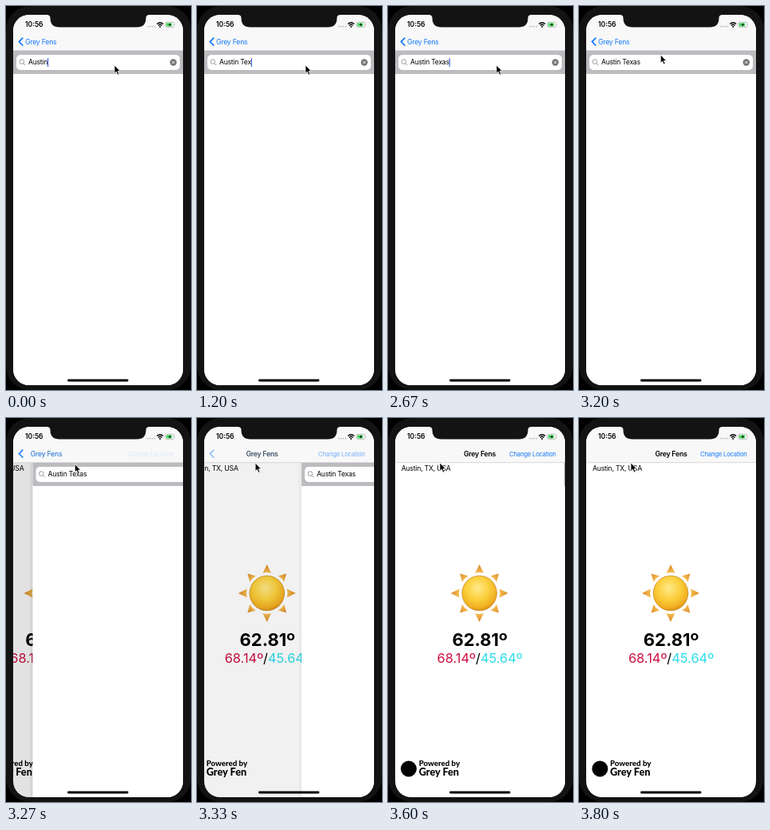
An HTML page that plays this animation: 232 px wide and 480 px high, repeating every 3990 ms.

```html
<!DOCTYPE html>
<html lang="en">
<head>
<meta charset="utf-8">
<title>Weather search</title>
<style>
  html, body { margin: 0; width: 100%; height: 100%; overflow: hidden; background: #000; }
  svg { display: block; width: 100vw; height: 100vh; }
  text { font: 8.75px Inter, "Liberation Sans", sans-serif; letter-spacing: -.25px; white-space: pre; }
  .mid { text-anchor: middle; }
  .blue { fill: #1479fb; }
  .bold { font-weight: 600; }
  .brand { font-family: Lato, "Open Sans", sans-serif; font-weight: 800; letter-spacing: 0; }
</style>
</head>
<body>
<svg viewBox="0 0 232 480">
  <defs>
    <clipPath id="screen"><rect x="9" y="11" width="213" height="463" rx="20"/></clipPath>
    <clipPath id="body"><rect x="9" y="56" width="213" height="418"/></clipPath>
    <radialGradient id="disc" cx=".45" cy=".36" r=".66">
      <stop offset="0" stop-color="#ffe98a"/>
      <stop offset=".5" stop-color="#fbd03c"/>
      <stop offset=".85" stop-color="#f0ae20"/>
      <stop offset="1" stop-color="#d48a18"/>
    </radialGradient>
    <linearGradient id="ray" x1="0" y1="0" x2="1" y2="0">
      <stop offset="0" stop-color="#f8bd50"/>
      <stop offset="1" stop-color="#d98a2a"/>
    </linearGradient>
    <linearGradient id="shade">
      <stop offset="0" stop-opacity="0"/>
      <stop offset="1" stop-opacity=".1"/>
    </linearGradient>
  </defs>

  <rect width="232" height="480"/>
  <rect width="232" height="480" rx="30" fill="#131313"/>

  <g clip-path="url(#screen)">
    <rect x="9" y="11" width="213" height="463" fill="#fff"/>

    <g clip-path="url(#body)">
      <g id="weather">
        <text x="17" y="66.3">Austin, TX, USA</text>
        <g id="sun" transform="translate(115 219)">
          <circle r="21.8" fill="url(#disc)" stroke="#c98a22" stroke-width=".8"/>
        </g>
        <text class="mid" x="115.5" y="284.5" style="font-size:22px;font-weight:700;letter-spacing:0">62.81º</text>
        <text class="mid" x="115.5" y="306.3" style="font-size:16.4px;letter-spacing:0"><tspan fill="#cb1040">68.14º</tspan>/<tspan fill="#2adcea">45.64º</tspan></text>
        <circle cx="26.3" cy="438.5" r="10"/>
        <text class="brand" x="39" y="435.3" style="font-size:9.7px">Powered by</text>
        <text class="brand" x="39" y="446.8" style="font-size:12.7px">Grey Fen</text>
      </g>
      <rect id="dim" x="9" y="56" width="213" height="418"/>

      <g id="search">
        <rect id="edge" x="4" y="56" width="5" height="418" fill="url(#shade)"/>
        <rect x="9" y="56" width="213" height="418" fill="#fff"/>
        <rect x="9" y="56" width="213" height="29" fill="#bcbbc0"/>
        <rect x="13" y="61" width="205" height="19" rx="5" fill="#fff"/>
        <g fill="none" stroke="#8e8e93" stroke-width=".9">
          <circle cx="19.8" cy="69.6" r="2.8"/>
          <path d="M21.9 71.7 L24.4 74.2"/>
        </g>
        <text id="query" x="28" y="73.4" style="font-size:8.6px"></text>
        <rect id="caret" y="65" width="1.1" height="11" fill="#3a5fe0"/>
        <circle cx="209.8" cy="70.5" r="4.2" fill="#747478"/>
        <path d="M208.2 68.9 l3.2 3.2 m0 -3.2 l-3.2 3.2" stroke="#fff" stroke-width=".9"/>
      </g>
    </g>

    <rect x="9" y="11" width="213" height="45" fill="#f8f8f8"/>
    <rect x="9" y="55.6" width="213" height=".5" fill="#b4b4b6"/>
    <path id="chevron" d="M21.3 39.6 L16.4 44.6 L21.3 49.6" fill="none" stroke="#1479fb" stroke-width="1.7"/>
    <text id="back" class="blue" y="47.8">Grey Fens</text>
    <text id="title" class="mid bold" y="47.8">Grey Fens</text>
    <text id="change" class="blue" x="152" y="47.5" style="font-size:7.7px;letter-spacing:-.2px">Change Location</text>

    <text class="bold" x="24" y="26.4" style="font-size:8.5px;letter-spacing:0">10:56</text>
    <g fill="#b5b5b5">
      <circle cx="178" cy="25.6" r=".9"/><circle cx="180.8" cy="25.6" r=".9"/>
      <circle cx="183.6" cy="25.6" r=".9"/><circle cx="186.4" cy="25.6" r=".9"/>
    </g>
    <g fill="none" stroke="#000" stroke-width="1.4">
      <path d="M189.2 22.6 Q193.2 18.8 197.2 22.6"/>
      <path d="M190.9 24.4 Q193.2 22.2 195.5 24.4"/>
    </g>
    <circle cx="193.2" cy="26" r="1"/>
    <rect x="199.8" y="20.2" width="11" height="6.4" rx="1.8" fill="#fff" stroke="#9a9a9a" stroke-width=".6"/>
    <rect x="200.8" y="21.2" width="7.5" height="4.4" rx=".9" fill="#4cd964"/>
    <path d="M211.6 22.2 v2.4 q1 -1.2 0 -2.4" fill="#9a9a9a"/>
    <path d="M206.2 20.8 L203.6 23.9 H205.2 L204.5 26 L207.1 22.9 H205.5 Z"/>

    <path d="M51 10 V11 Q55.5 11 55.5 15 Q55.5 26.5 67 26.5 H164 Q175.5 26.5 175.5 15 Q175.5 11 180 11 V10 Z" fill="#131313"/>
    <rect x="77" y="466.6" width="76.5" height="2.8" rx="1.4"/>
  </g>

  <path id="pointer" d="M0 0 V10.2 L2.3 8.1 L4 12 L5.8 11.2 L4.1 7.5 H7.2 Z" stroke="#fff" stroke-width=".7"/>
</svg>

<script>
const LOOP = 3990, TICK = 200 / 3, WIDTH = 213;
const QUERY = "Austin Texas";
// [time, letters typed]
const TYPING = [[0, 6], [130, 7], [530, 8], [870, 9], [1200, 10], [1330, 11], [1530, 12]];
// [time, caret opacity]
const BLINK = [[0, 1], [2000, 1], [2200, 0], [2535, 0], [2665, 1], [3000, 1], [3200, 0], [LOOP, 0]];

const $ = id => document.getElementById(id);
const set = (id, attrs) => {
  for (const key in attrs) $(id).setAttribute(key, attrs[key]);
};
const mix = (a, b, k) => a + (b - a) * k;
const clamp = v => Math.min(1, Math.max(0, v));

function addRays() {
  for (let i = 0; i < 8; i++) {
    const ray = document.createElementNS("http://www.w3.org/2000/svg", "path");
    const tip = i % 2 ? 34.5 : 36;
    ray.setAttribute("d", `M25 -5.4 Q26.8 0 25 5.4 L${tip} 0 Z`);
    ray.setAttribute("transform", `rotate(${i * 45})`);
    ray.setAttribute("fill", "url(#ray)");
    $("sun").append(ray);
  }
}

function ramp(steps, t) {
  const i = steps.findIndex(step => step[0] > t);
  if (i < 0) return steps[steps.length - 1][1];
  const [t0, a] = steps[i - 1], [t1, b] = steps[i];
  return mix(a, b, (t - t0) / (t1 - t0));
}

// critically damped spring for the pop transition
function spring(t) {
  const x = Math.max(0, t - 3238) * .0202;
  return 1 - (1 + x) * Math.exp(-x);
}

function drawQuery(time, t) {
  const typed = TYPING.filter(step => step[0] <= time).pop()[1];
  const query = $("query"), text = QUERY.slice(0, typed);
  if (query.textContent !== text) query.textContent = text;
  set("caret", { x: 28 + query.getComputedTextLength(), opacity: ramp(BLINK, t) });
}

function drawSlide(t) {
  const p = t > 3790 ? 1 : spring(t);
  set("search", { transform: `translate(${p * WIDTH} 0)` });
  set("edge", { opacity: p > 0 ? 1 - p : 0 });
  set("weather", { transform: `translate(${(p - 1) * WIDTH * .3} 0)` });
  set("dim", { opacity: .13 * (1 - p) });
  const shift = 71.7 * p - 14 * p * (1 - p);
  set("chevron", { opacity: 1 - p });
  set("back", { x: 24 + shift, opacity: 1 - p });
  set("title", { x: 43.8 + shift, opacity: p });
  set("change", { opacity: p });
}

function drawPointer(t) {
  const u = clamp((t - 2990) / 435), s = u * u * (3 - 2 * u);
  const y = mix(74, 56, 1 - (1 - s) ** 2);
  set("pointer", { transform: `translate(${mix(136, 65, s)} ${y})` });
}

function draw(time) {
  const t = Math.floor((time + 4) / TICK) * TICK;
  drawQuery(time, t);
  drawSlide(t);
  drawPointer(t);
}

const start = performance.now();
function loop() {
  draw((performance.now() - start) % LOOP);
  requestAnimationFrame(loop);
}

addRays();
loop();
</script>
</body>
</html>
```
